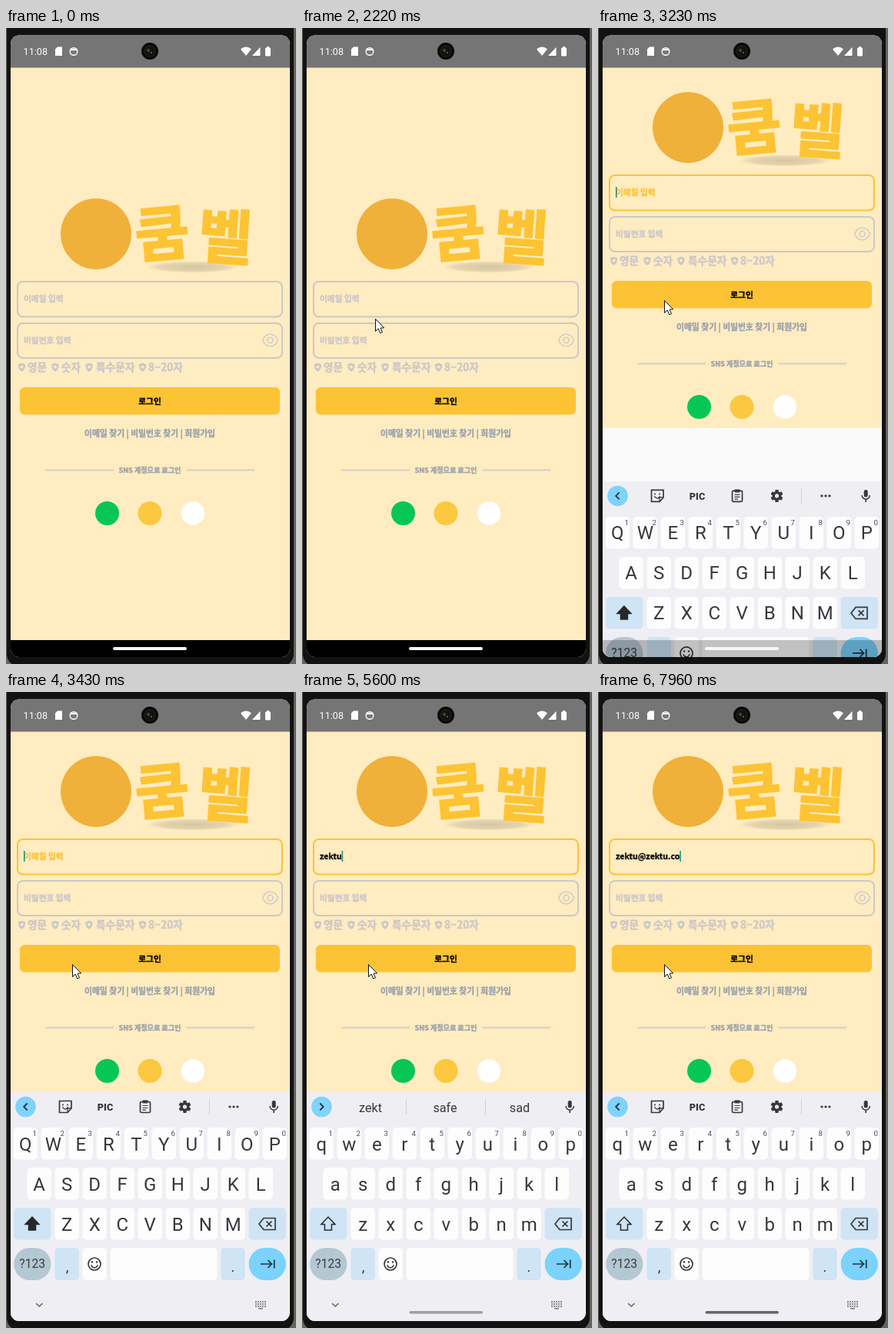
An HTML page with a canvas that plays this animation: 377x825 px, repeating every 8000 ms.

```html
<!DOCTYPE html>
<html lang="ko">
<head>
<meta charset="utf-8">
<style>
html, body { margin: 0; width: 100%; height: 100%; overflow: hidden; background: #111; }
canvas { display: block; width: 377px; height: 825px; }
</style>
</head>
<body>
<canvas id="stage" width="377" height="825"></canvas>
<script>
const c = document.getElementById('stage').getContext('2d');
const LOOP = 8000;
const KR = '"Noto Sans CJK KR", "Noto Sans CJK", "Noto Sans CJK JP", sans-serif';
const UI = 'Roboto, sans-serif';
const YELLOW = '#fcc434', CREAM = '#ffecc1', GREY = '#cbc8c9', INK = '#36383c';
const TAU = Math.PI * 2;
const NAV_TOP = 794, KEYBOARD_TOP = 519;

const EMAIL = 'zektu@zektu.co';
const KEY_TIMES = [3950, 4480, 4840, 5530, 5600, 6500, 6850, 7180, 7400, 7470, 7650, 7750, 7860, 7960];
const SUGGESTIONS = [
  [4000, ['z', 'so', 'see']],
  [4530, ['ze', 'so', 'see']],
  [4900, ['zek', 'safe', 'sad']],
  [5560, ['zekt', 'safe', 'sad']],
  [6080, ['zektu', 'safe', 'safety']]
];
const POINTER = [[160, 313, 812], [950, 207, 639], [1050, 205, 634], [1790, 112, 424],
  [1890, 109, 417], [2220, 95, 377], [2450, 74, 341], [2680, 86, 353]];

const clamp = v => Math.max(0, Math.min(1, v));
const ramp = (t, a, b) => clamp((t - a) / (b - a));
const easeOut = p => 1 - (1 - p) * (1 - p);

function text(s, x, y, size, color, { align = 'left', weight = 400, family = UI } = {}) {
  c.font = `${weight} ${size}px ${family}`;
  c.textAlign = align;
  c.textBaseline = 'alphabetic';
  c.fillStyle = color;
  c.fillText(s, x, y);
}
// A thin outline gives the heavy display weight.
function korean(s, x, y, size, color, align, outline = .4) {
  text(s, x, y, size, color, { align, weight: 900, family: KR });
  c.strokeStyle = color;
  c.lineWidth = outline;
  c.lineJoin = 'round';
  c.strokeText(s, x, y);
}

function box(x, y, w, h, r, fill, stroke, width = 1.5) {
  c.beginPath();
  c.roundRect(x, y, w, h, r);
  paint(fill, stroke, width);
}
function disc(x, y, r, fill, stroke, width) {
  c.beginPath();
  c.arc(x, y, r, 0, TAU);
  paint(fill, stroke, width);
}
function poly(points, fill, stroke, width, open) {
  c.beginPath();
  points.forEach(([x, y]) => c.lineTo(x, y));
  if (!open) c.closePath();
  paint(fill, stroke, width);
}
function paint(fill, stroke, width = 1.5) {
  if (fill) { c.fillStyle = fill; c.fill(); }
  if (stroke) { c.strokeStyle = stroke; c.lineWidth = width; c.stroke(); }
}
const line = (points, color, width = 1.7) => poly(points, null, color, width, true);

function drawStatus() {
  c.fillStyle = '#757575';
  c.fillRect(6, 9, 363, 42.5);
  text('11:08', 22.5, 35, 12.7, '#fff');
  poly([[67, 24.5], [73, 24.5], [73, 36], [64, 36], [64, 27.5]], '#fff');
  disc(88, 30.5, 4.8, null, '#fff', 1.4);
  c.fillStyle = '#fff';
  c.fillRect(84, 27, 8, 2.2);
  c.beginPath();
  c.moveTo(312, 36);
  c.lineTo(305, 27.5);
  c.quadraticCurveTo(312, 21.5, 319, 27.5);
  c.closePath();
  c.fill();
  poly([[320, 36], [330.5, 36], [330.5, 25]], '#fff');
  box(337, 25.5, 7, 11, 1, '#fff');
  c.fillRect(339, 24, 3, 2);
  disc(187, 30, 11, '#080808');
  disc(187, 30, 7, '#14120f', '#2a2823', 1);
  disc(185, 29, 2, '#594427');
  disc(189, 32, 1, '#8a754e');
}

function drawLogo() {
  const g = c.createRadialGradient(0, 0, 0, 0, 0, 60);
  g.addColorStop(0, 'rgba(150,140,115,.4)');
  g.addColorStop(.7, 'rgba(150,140,115,.25)');
  g.addColorStop(1, 'rgba(150,140,115,0)');
  c.save();
  c.translate(243, 310);
  c.scale(1, .13);
  disc(0, 0, 60, g);
  c.restore();
  disc(117, 267, 46, '#efb13a');
  [['쿰', 203, 266, -.09], ['벨', 285, 270, .07]].forEach(([s, x, y, tilt]) => {
    c.save();
    c.translate(x, y);
    c.rotate(tilt);
    korean(s, 0, 29, 77, YELLOW, 'center', 2);
    c.restore();
  });
}

function shield(x, y) {
  c.beginPath();
  c.moveTo(x, y - 5.5);
  c.lineTo(x + 4.7, y - 3.7);
  c.bezierCurveTo(x + 4.7, y + 1, x + 3.5, y + 4, x, y + 5.7);
  c.bezierCurveTo(x - 3.5, y + 4, x - 4.7, y + 1, x - 4.7, y - 3.7);
  c.closePath();
  paint(GREY);
  disc(x, y - .4, 1.9, CREAM);
}

function drawForm(t) {
  const focused = t >= 2840;
  const typed = EMAIL.slice(0, KEY_TIMES.filter(k => t >= k).length);
  drawLogo();
  box(15, 329, 344, 45.5, 7, null, focused ? YELLOW : GREY, 2);
  box(15, 383, 344, 45, 7, null, GREY, 2);
  if (typed) korean(typed, 23, 355, 10.6, '#111');
  else korean('이메일 입력', 23, 354.5, 10.7, focused ? YELLOW : GREY);
  if (focused) {
    const end = typed ? 23 + c.measureText(typed).width : 23;
    c.fillStyle = '#1d8b78';
    c.fillRect(end, 344, 1.5, 14);
  }
  korean('비밀번호 입력', 23, 408.5, 10.7, GREY);

  c.beginPath();
  c.moveTo(333.5, 405);
  c.bezierCurveTo(338, 394.5, 349, 394.5, 353.5, 405);
  c.bezierCurveTo(349, 415.5, 338, 415.5, 333.5, 405);
  paint(null, GREY, 1.4);
  disc(343.5, 405, 3.6, null, GREY, 1.4);

  [['영문', 20.5, 28], ['숫자', 64, 72], ['특수문자', 108, 117], ['8~20자', 177.5, 185]]
    .forEach(([s, iconX, x]) => {
      shield(iconX, 440);
      korean(s, x, 445, 13.7, GREY);
    });

  box(18, 466, 338, 35.5, 6, YELLOW);
  korean('로그인', 187, 488, 10.7, '#0c0b08', 'center');
  korean('이메일 찾기 | 비밀번호 찾기 | 회원가입', 187, 529.5, 10.8, '#9ca2ac', 'center');
  line([[51, 573.5], [140, 573.5]], '#d2cfca', 2);
  line([[235, 573.5], [323, 573.5]], '#d2cfca', 2);
  korean('SNS 계정으로 로그인', 187, 577, 9.1, '#9ca2ac', 'center');
  disc(131.5, 629.5, 15.5, '#06c755');
  disc(187, 629.5, 15.5, '#fbc83f');
  disc(243, 629.5, 15.2, '#fff');
}

function drawMic() {
  box(345.7, 530, 5, 9.5, 2.5, INK);
  c.beginPath();
  c.arc(348.2, 537, 5.2, 0, Math.PI);
  paint(null, INK, 1.5);
  line([[348.2, 542], [348.2, 546]], INK, 1.6);
}

function drawToolIcons() {
  poly([[69.5, 530.5], [85, 530.5], [85, 540], [80, 545.5], [69.5, 545.5]], null, INK, 1.7);
  line([[85, 540], [80, 540], [80, 545.5]], INK, 1.3);
  disc(74, 535.5, 1, INK);
  disc(80, 535.5, 1, INK);
  c.beginPath();
  c.arc(77, 537.5, 3.5, .2, Math.PI - .2);
  paint(null, INK, 1.4);

  text('PIC', 129, 542.6, 12.7, INK, { align: 'center', weight: 900 });

  box(174.5, 531.5, 13, 14, 1.5, null, INK, 1.7);
  box(177.5, 529.5, 7, 4, 1, INK);
  [536.5, 539.5, 542.2].forEach((y, i) => line([[177.5, y], [i < 2 ? 184.5 : 182, y]], INK, 1.2));

  for (let i = 0; i < 6; i++) {
    c.save();
    c.translate(232.5, 538);
    c.rotate(i * TAU / 6);
    box(-2.2, -8, 4.4, 5, .8, INK);
    c.restore();
  }
  disc(232.5, 538, 4.3, null, INK, 3.4);

  line([[264.5, 528], [264.5, 548]], '#cfd0d4', 1);
  [291, 296, 301].forEach(x => disc(x, 538, 1.6, INK));
}

function drawToolbar(t) {
  const words = t < 6500 && SUGGESTIONS.filter(s => t >= s[0]).pop();
  disc(25.5, 538, 13.3, '#80d3fc');
  const dir = words ? -1 : 1;
  line([[25.5 + 2.2 * dir, 533.5], [25.5 - 2.3 * dir, 538], [25.5 + 2.2 * dir, 542.5]], '#243644', 1.8);
  if (words) {
    words[1].forEach((w, i) => text(w, 89 + 97 * i, 544.5, 16.2, INK, { align: 'center' }));
    [135.5, 238.5].forEach(x => line([[x, 528], [x, 548]], '#cfd0d4', 1));
  } else {
    drawToolIcons();
  }
  drawMic();
}

function letterRow(letters, firstX, top, upper, numbered) {
  [...letters].forEach((ch, i) => {
    const x = firstX + 36 * i;
    box(x - 15.7, top, 31.4, 41.5, 5, '#fdfdfe');
    text(upper ? ch.toUpperCase() : ch, x, top + 29.5, 24, INK, { align: 'center' });
    if (numbered) text((i + 1) % 10, x + 12, top + 10.7, 9.7, '#4c4e53', { align: 'center' });
  });
}

function drawKeyboard(t) {
  const upper = t < 3980;
  const blue = '#cfe4f4';
  c.fillStyle = '#efeff3';
  c.fillRect(6, KEYBOARD_TOP, 363, 300);
  drawToolbar(t);
  letterRow('qwertyuiop', 25.3, 565, upper, true);
  letterRow('asdfghjkl', 43.2, 617, upper);
  letterRow('zxcvbnm', 79.2, 669, upper);

  box(10, 669, 48.5, 41.5, 5, blue);
  poly([[34, 681], [43, 690.5], [38.5, 690.5], [38.5, 698], [29.5, 698], [29.5, 690.5], [25, 690.5]],
    upper ? '#26282b' : null, '#26282b', 1.5);
  box(315.5, 669, 48.5, 41.5, 5, blue);
  poly([[329, 690], [335, 682.5], [350, 682.5], [350, 697.5], [335, 697.5]], null, INK, 1.7);
  line([[338.5, 686.5], [345.5, 693.5]], INK);
  line([[345.5, 686.5], [338.5, 693.5]], INK);

  box(10, 721, 48.5, 42, 21, '#b4c8d4');
  text('?123', 34.2, 747, 15.6, INK, { align: 'center' });
  box(63.5, 721, 31.4, 42, 5, blue);
  text(',', 79.5, 752, 19, INK, { align: 'center' });
  box(99.5, 721, 31.4, 42, 5, '#fdfdfe');
  disc(115, 742, 8, null, INK, 1.7);
  disc(112, 739.5, 1.2, INK);
  disc(118, 739.5, 1.2, INK);
  c.beginPath();
  c.arc(115, 742.5, 4.2, .15, Math.PI - .15);
  paint(null, INK, 1.5);
  box(135.5, 721, 139, 42, 5, '#fdfdfe');
  box(279.3, 721, 31.4, 42, 5, blue);
  text('.', 295, 752, 19, INK, { align: 'center' });
  box(315.5, 721, 48.5, 42, 21, '#7ad2fd');
  line([[331, 742], [345, 742]], '#20303b');
  line([[340.5, 737], [345.5, 742], [340.5, 747]], '#20303b');
  line([[348.7, 736.5], [348.7, 747.5]], '#20303b');

  line([[39, 793], [43.3, 797], [47.6, 793]], '#606267', 1.5);
  c.fillStyle = '#75777b';
  for (let i = 0; i < 15; i++) c.fillRect(324 + 3 * (i % 5), 790 + 3 * Math.floor(i / 5), 1.8, 1.8);
  c.fillRect(328, 799, 6, 1.5);
}

function drawNav(t) {
  c.globalAlpha = 1 - ramp(t, 3070, 3280);
  c.fillStyle = '#000';
  c.fillRect(6, NAV_TOP, 363, 23);
  c.globalAlpha = 1 - ramp(t, 3240, 3400);
  box(139, 803, 96, 4, 2, '#f7f7f7');
  c.globalAlpha = 1;
  if (t >= 3790) {
    const shade = Math.round(215 - 113 * ramp(t, 3790, 7470));
    box(139.5, 803, 95.5, 3.6, 1.8, `rgb(${shade},${shade},${shade + 1})`);
  }
}

function drawPointer(t) {
  if (t < POINTER[0][0]) return;
  const next = POINTER.findIndex(p => p[0] > t);
  let [, x, y] = POINTER[POINTER.length - 1];
  if (next > 0) {
    const a = POINTER[next - 1], b = POINTER[next];
    const p = ramp(t, a[0], b[0]);
    x = a[1] + (b[1] - a[1]) * p;
    y = a[2] + (b[2] - a[2]) * p;
  }
  c.save();
  c.translate(Math.round(x) + .5, Math.round(y) + .5);
  poly([[0, 0], [0, 16], [3.7, 12.5], [6.3, 18.3], [9, 17.1], [6.5, 11.6], [11.2, 11.4]], '#fff', '#111', 1);
  c.restore();
}

function drawPhone() {
  c.fillStyle = '#66635b';
  c.fillRect(0, 0, 377, 825);
  box(1, -20, 373, 848, 16, '#121212');
}

function draw(t) {
  const resized = t >= 2980;
  const viewEnd = resized ? KEYBOARD_TOP : NAV_TOP;
  drawPhone();
  c.save();
  c.beginPath();
  c.roundRect(6, 9.5, 363, 806.5, 11);
  c.clip();
  c.fillStyle = '#fafafa';
  c.fillRect(6, 9, 363, 808);

  c.save();
  c.beginPath();
  c.rect(6, 51, 363, viewEnd - 51);
  c.clip();
  c.fillStyle = CREAM;
  c.fillRect(6, 51, 363, 745);
  c.translate(0, -138 * easeOut(ramp(t, 3060, 3200)));
  drawForm(t);
  c.restore();

  drawStatus();
  if (t > 3060) {
    c.save();
    c.translate(0, 297 * (1 - easeOut(ramp(t, 3060, 3390))));
    drawKeyboard(t);
    c.restore();
  }
  drawNav(t);
  c.restore();
  drawPointer(t);
}

function tick() {
  draw(performance.now() % LOOP);
  requestAnimationFrame(tick);
}
tick();
</script>
</body>
</html>
```
